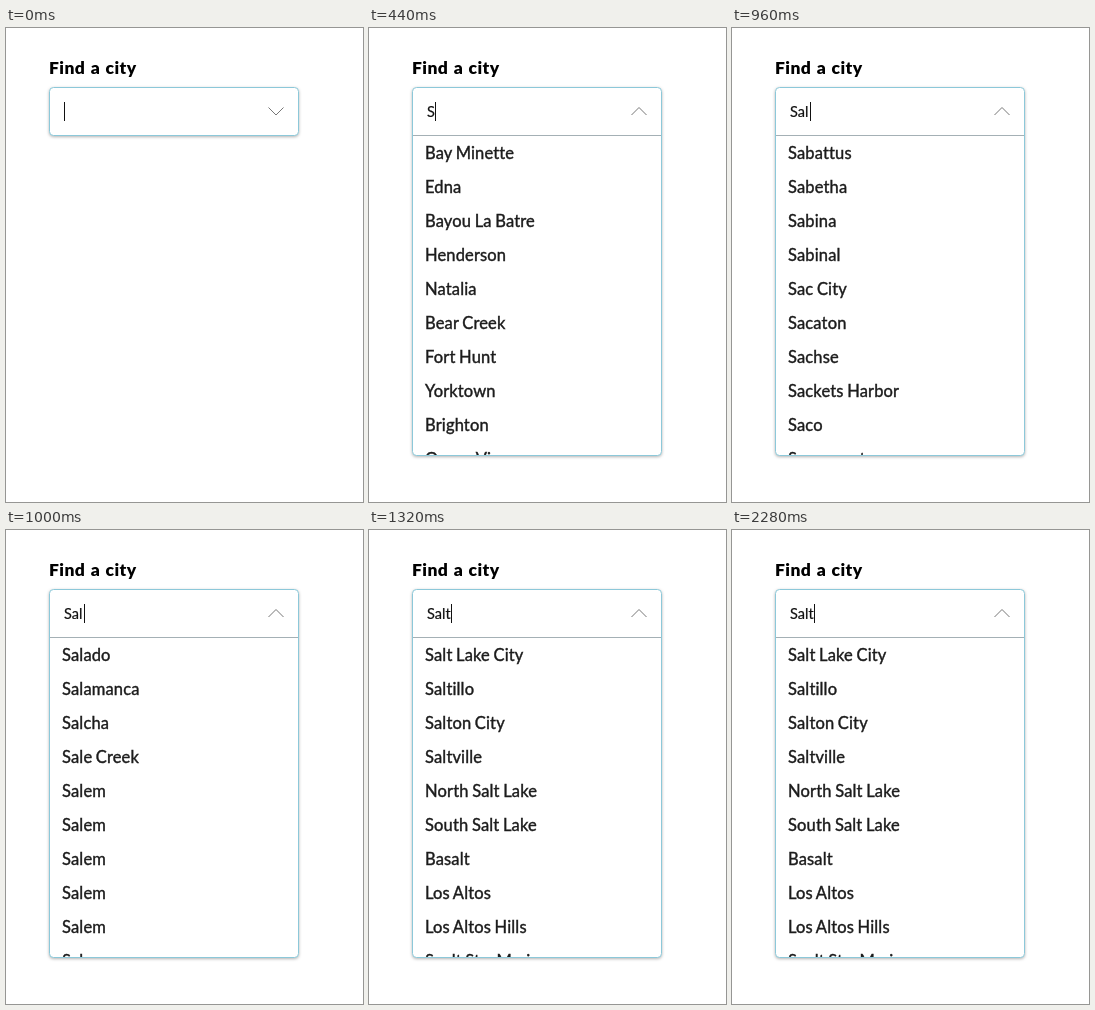
Recreate the animation shown at these times as an HTML page. Size 357 by 474 pixels, loop 2.48 s.

```html
<!DOCTYPE html>
<html lang="en">
<head>
<meta charset="utf-8">
<title>City search</title>
<style>
  html, body { margin: 0; height: 100%; overflow: hidden; background: #fff; }
  svg { display: block; font-family: Lato, "Open Sans", sans-serif; font-variant-ligatures: none; }
  .title { font-size: 17.5px; font-weight: 900; letter-spacing: .4px; word-spacing: 1px; }
  .typed { font-size: 14.5px; fill: #111; stroke: #111; stroke-width: .2; }
  .rows { font-size: 16.5px; letter-spacing: .15px; word-spacing: -.8px; fill: #1c1c1c; stroke: #1c1c1c; stroke-width: .4; }
  .box { fill: #fff; stroke: #8cc8d9; filter: drop-shadow(0 1px 1.5px rgba(0, 0, 0, .3)); }
  .chevron { fill: none; stroke: #777; }
</style>
</head>
<body>
<svg width="357" height="474" viewBox="0 0 357 474">
  <defs>
    <clipPath id="panel"><path d="M44 108H292V427H44Z"/></clipPath>
  </defs>
  <text class="title" x="43" y="46">Find a city</text>
  <rect class="box" id="box" x="43.5" y="59.5" width="249" rx="4"/>
  <path class="chevron" id="chevron"/>
  <text class="typed" id="typed" x="58" y="89"></text>
  <path id="caret" stroke="#111"/>
  <g id="list">
    <path d="M44 107.5H292" stroke="#a4b0b5"/>
    <g class="rows" id="rows" clip-path="url(#panel)"></g>
  </g>
</svg>
<script>
const LOOP = 2480;
const $ = id => document.getElementById(id);

const cities = {
  all: "Bay Minette,Edna,Bayou La Batre,Henderson,Natalia,Bear Creek,Fort Hunt,Yorktown,Brighton,Ocean View",
  s: "Sabattus,Sabetha,Sabina,Sabinal,Sac City,Sacaton,Sachse,Sackets Harbor,Saco,Sacramento",
  sal: "Salado,Salamanca,Salcha,Sale Creek,Salem,Salem,Salem,Salem,Salem,Salem",
  salt: "Salt Lake City,Saltillo,Salton City,Saltville,North Salt Lake,South Salt Lake,Basalt,Los Altos,Los Altos Hills,Sault Ste. Marie"
};

// [start time, value]
const typing = [[0, 0], [320, 1], [760, 2], [960, 3], [1280, 4]];
const results = [[0, ""], [440, "all"], [480, "s"], [1000, "sal"], [1320, "salt"]];
const caretX = [58.5, 66.5, 75.5, 78.5, 82.5];

const at = (track, t) => track.filter(([start]) => start <= t).pop()[1];

let shown;
function showList(key) {
  if (key === shown) return;
  shown = key;
  $("list").style.display = key ? "" : "none";
  $("box").setAttribute("height", key ? 368 : 48);
  $("chevron").setAttribute("d", key ? "M262.5 87L270 79.5L277.5 87" : "M262.5 79.5L270 87L277.5 79.5");
  $("rows").innerHTML = (cities[key] || "").split(",")
    .map((city, i) => `<text x="56" y="${130.5 + 34 * i}">${city}</text>`).join("");
}

function frame(now) {
  const t = now % LOOP;
  const count = at(typing, t);
  showList(at(results, t));
  $("typed").textContent = "Salt".slice(0, count);
  $("caret").setAttribute("d", `M${caretX[count]} 74V93`);
  $("caret").style.display = t >= 1800 && t < 2280 ? "none" : "";
  requestAnimationFrame(frame);
}
frame(0);
</script>
</body>
</html>
```
